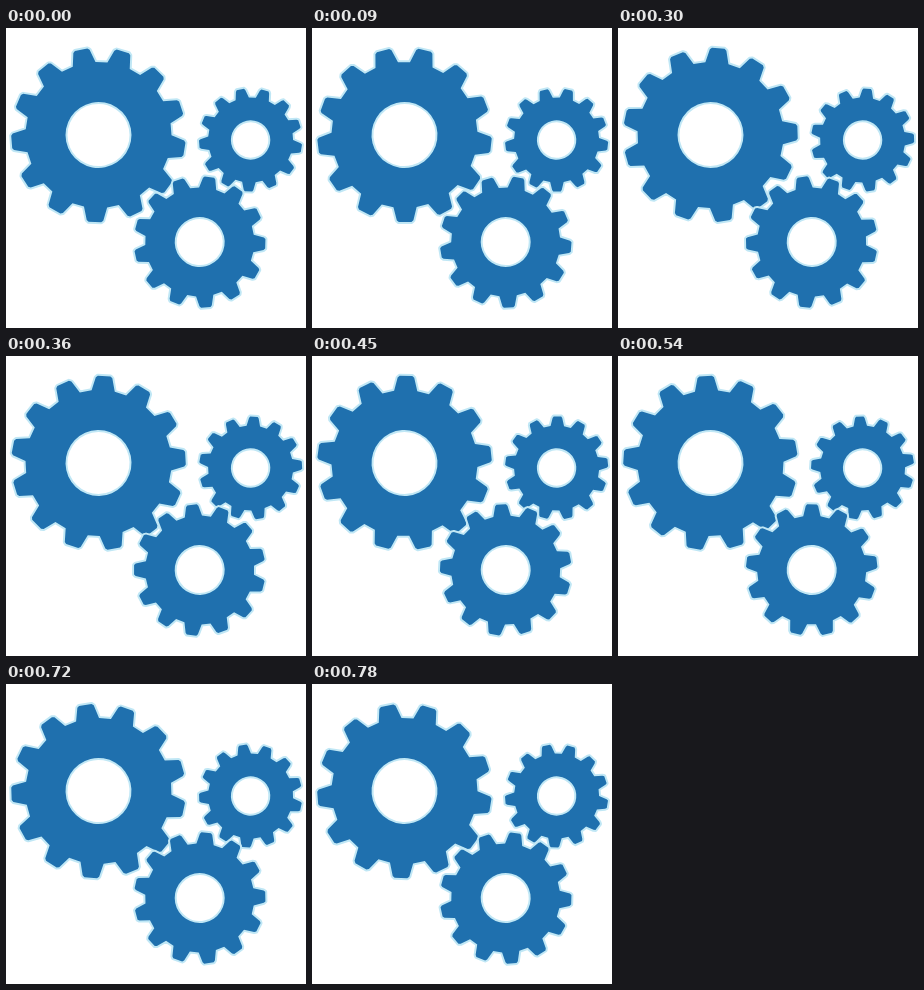
These frames come from a looping animation (300x300 px, 810 ms). An HTML page with a canvas:

```html
<!DOCTYPE html>
<html lang="en">
<head>
<meta charset="utf-8">
<title>Turning gears</title>
<style>
html, body { margin: 0; height: 100%; overflow: hidden; background: #fff; }
canvas { display: block; width: 300px; height: 300px; filter: blur(0.6px); }
</style>
</head>
<body>
<canvas id="stage"></canvas>
<script>
const LOOP = 810, STEP = 30, POSES = 20, TEETH = 13;
const HELD = [60, 180, 330, 420, 600, 660]; // times at which the pose does not advance
const scale = window.devicePixelRatio || 1;
const canvas = document.getElementById('stage');
canvas.width = canvas.height = 300 * scale;
const ctx = canvas.getContext('2d');

// start is the angle of one tooth in degrees clockwise from the top
const gears = [
  { x: 92.5, y: 107, tip: 87.3, root: 73, hole: 33, start: -11.5, dir: -1 },
  { x: 244.6, y: 112, tip: 51.6, root: 42.5, hole: 19.7, start: -11.5, dir: -1 },
  { x: 193.7, y: 214, tip: 65.8, root: 54.5, hole: 25, start: 8.5, dir: 1 }
];

function gearPath({ tip, root, hole }) {
  const path = new Path2D();
  const pitch = 2 * Math.PI / TEETH;
  const point = (radius, turn) =>
    path.lineTo(radius * Math.sin(turn * pitch), -radius * Math.cos(turn * pitch));
  for (let i = 0; i < TEETH; i++) {
    point(root, i - 0.33);
    point(tip - 1.5, i - 0.2);
    point(tip, i - 0.15);
    point(tip, i + 0.15);
    point(tip - 1.5, i + 0.2);
    point(root, i + 0.33);
  }
  path.closePath();
  path.moveTo(hole, 0);
  path.arc(0, 0, hole, 0, 2 * Math.PI, true);
  return path;
}

for (const gear of gears) gear.path = gearPath(gear);

function drawGear({ x, y, start, dir, path }, progress) {
  ctx.save();
  ctx.translate(x, y);
  ctx.rotate((start + dir * progress * 360 / TEETH) * Math.PI / 180);
  ctx.lineJoin = 'round';
  ctx.strokeStyle = '#c0e7f5';
  ctx.lineWidth = 4;
  ctx.stroke(path);
  ctx.fillStyle = '#1f70ae';
  ctx.fill(path, 'evenodd');
  ctx.restore();
}

const origin = performance.now();

function draw() {
  const time = Math.max(0, performance.now() - origin) % LOOP;
  const pose = Math.floor(time / STEP) - HELD.filter(held => held <= time).length;
  ctx.setTransform(scale, 0, 0, scale, 0, 0);
  ctx.fillStyle = '#fff';
  ctx.fillRect(0, 0, 300, 300);
  for (const gear of gears) drawGear(gear, pose / POSES);
  requestAnimationFrame(draw);
}

draw();
</script>
</body>
</html>
```
